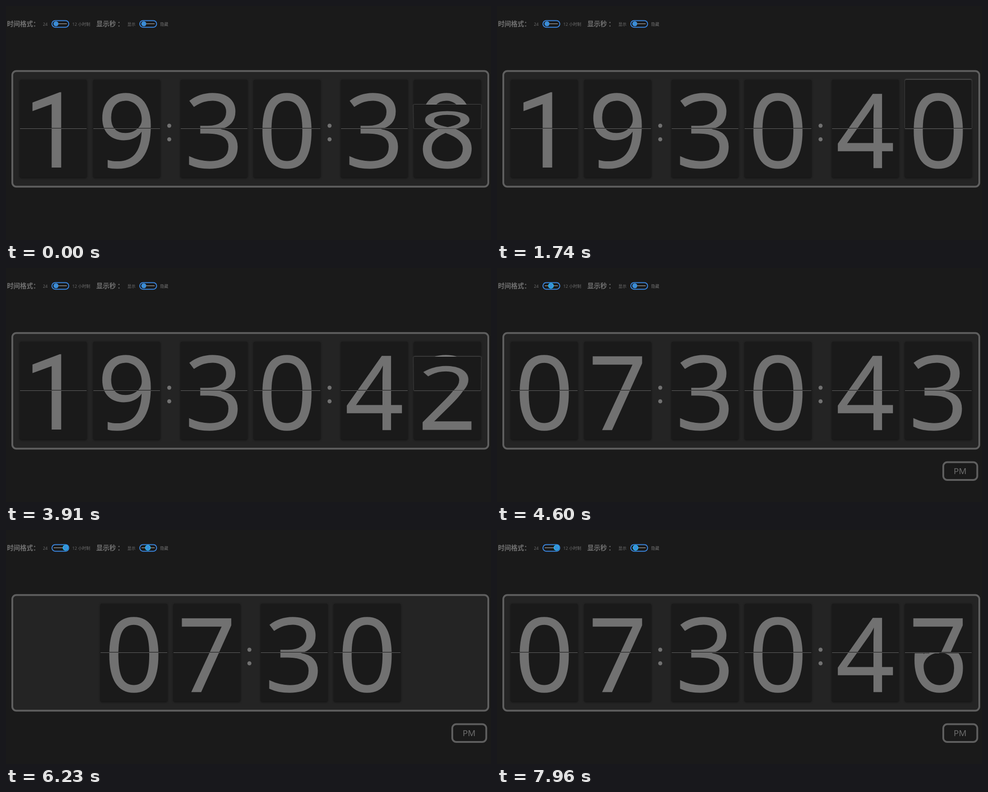
Animation, 1077 px wide and 520 px high, one loop 8000 ms. Source, as an HTML page:

```html
<!DOCTYPE html>
<html lang="zh">
<head>
<meta charset="utf-8">
<title>Flip clock</title>
<style>
  html, body { margin: 0; width: 100%; height: 100%; overflow: hidden; background: #1a1a1a; }
  #stage { position: relative; width: 1077px; height: 520px; overflow: hidden; }
  svg { position: absolute; left: 0; display: block; }
  text { fill: #717171; font-family: "Open Sans", "Noto Sans", "Noto Sans CJK SC", sans-serif; }
  .label { font: 700 14.5px "Noto Sans CJK SC", sans-serif; }
  .note { font-size: 9px; }
  .frame { stroke: #5f5f5f; stroke-width: 4; }
  .dot { fill: #717171; }
  .track { fill: #1a1a1a; stroke: #3a87e2; stroke-width: 2; }
  .rail { fill: #c8c8c8; }
  .knob { fill: #3b8dd8; }
  .knob.lit { stroke: #22bdf0; stroke-width: 1.5; }

  .card {
    position: absolute; top: 164px; width: 148px; height: 217px;
    border-radius: 3px; background: #1a1a1a;
    box-shadow: 0 1px 4px rgba(0, 0, 0, .65);
  }
  .half { position: absolute; left: 0; width: 148px; overflow: hidden; background: #1a1a1a; }
  .upper { top: 0; height: 109px; border-radius: 3px 3px 0 0; transform-origin: 50% 100%; }
  .lower { top: 109px; height: 108px; border-radius: 0 0 3px 3px; transform-origin: 50% 0; }
  .lower svg { top: -109px; }
  /* dark gap above the hinge line */
  .upper::after {
    content: ""; position: absolute; left: 0; right: 0; bottom: 0; height: 2px;
    background: linear-gradient(#1a1a1a 50%, #666 50%);
  }
  .flap.upper { box-shadow: 0 -1px 3px rgba(255, 255, 255, .35); }
  /* a thin outline gives the digits a slightly heavier stem */
  .digit { font-size: 228px; text-anchor: middle; stroke: #717171; stroke-width: 1.4px; }
  .digit.one { font-family: Roboto, sans-serif; font-size: 234px; stroke: none; }
</style>
</head>
<body>
<div id="stage">
  <svg width="1077" height="520">
    <text class="label" x="2" y="45.4">时间格式：</text>
    <text class="note" x="82" y="43.6">24</text>
    <text class="note" x="147.3" y="43.6">12 小时制</text>
    <text class="label" x="200.5" y="45.4">显示秒 ：</text>
    <text class="note" x="269.5" y="43.6">显示</text>
    <text class="note" x="342.3" y="43.6">隐藏</text>

    <g transform="translate(101 31)">
      <rect class="track" x="1" y="1.4" width="37.5" height="14.8" rx="7.4"/>
      <rect class="rail" x="5" y="8" width="29" height="1"/>
      <circle class="knob" cx="10" cy="8.5" r="5.5"/>
    </g>
    <g transform="translate(296 31)">
      <rect class="track" x="1" y="1.4" width="37.5" height="14.8" rx="7.4"/>
      <rect class="rail" x="5" y="8" width="29" height="1"/>
      <circle class="knob" cx="10" cy="8.5" r="5.5"/>
    </g>

    <rect class="frame" x="14" y="144.5" width="1057" height="257" rx="9" fill="#242424"/>
    <g class="colon"><circle class="dot" cy="266" r="4.5"/><circle class="dot" cy="296.3" r="4.5"/></g>
    <g class="colon"><circle class="dot" cy="266" r="4.5"/><circle class="dot" cy="296.3" r="4.5"/></g>

    <g id="period">
      <rect class="frame" x="991" y="431.5" width="75.5" height="39.5" rx="9" fill="none"/>
      <text x="1028.3" y="458" font-size="19" text-anchor="middle">PM</text>
    </g>
  </svg>
</div>

<script>
  const LOOP = 8000, FLIP = 600, SLIDE = 1000;
  const ticks = [-241, 734, 1732, 2707, 3700, 4690, 5680, 6670, 7660];
  const FIRST_SECOND = 38;
  const TO_12H = 4229, HIDE = 5854, SHOW = 7400;
  const wideX = [31, 194, 388, 550, 744, 906];
  const narrowX = [210, 372, 566, 728, 0, 0];

  const stage = document.getElementById("stage");
  const period = document.getElementById("period");
  const knobs = document.querySelectorAll(".knob");
  const colons = document.querySelectorAll(".colon");

  // CSS-style cubic bezier, solved by bisection
  function bezier(x1, y1, x2, y2) {
    const at = (s, a, b) => 3 * s * (1 - s) ** 2 * a + 3 * s * s * (1 - s) * b + s ** 3;
    return x => {
      if (x <= 0) return 0;
      if (x >= 1) return 1;
      let lo = 0, hi = 1;
      for (let i = 0; i < 24; i++) {
        const mid = (lo + hi) / 2;
        if (at(mid, x1, x2) < x) lo = mid; else hi = mid;
      }
      return at(lo, y1, y2);
    };
  }
  const easeInOut = bezier(.42, 0, .58, 1);
  const easeBack = bezier(.5, 0, .5, 1.7);

  function addHalf(card, kind) {
    const el = document.createElement("div");
    el.className = "half " + kind;
    el.innerHTML = '<svg width="148" height="217"><text class="digit" x="74" y="194.5"></text></svg>';
    card.append(el);
    return { el, text: el.querySelector("text") };
  }

  function makeCard() {
    const el = document.createElement("div");
    el.className = "card";
    stage.append(el);
    return {
      el,
      upper: addHalf(el, "upper"),
      lower: addHalf(el, "lower"),
      falling: addHalf(el, "flap upper"),
      landing: addHalf(el, "flap lower")
    };
  }
  const cards = wideX.map(makeCard);

  function setDigit(half, digit) {
    if (half.text.textContent === digit) return;
    half.text.textContent = digit;
    half.text.classList.toggle("one", digit === "1");
  }

  function setFlap(half, visible, angle) {
    half.el.style.display = visible ? "" : "none";
    half.el.style.transform = `perspective(7000px) rotateX(${angle}deg)`;
  }

  function drawCard(card, from, to, p) {
    const moving = from !== to && p < 1;
    setDigit(card.upper, to);
    setDigit(card.lower, moving ? from : to);
    setDigit(card.falling, from);
    setDigit(card.landing, to);
    setFlap(card.falling, moving && p < .5, -180 * p);
    setFlap(card.landing, moving && p >= .5, 180 * (1 - p));
  }

  function drawKnob(knob, pos, lit) {
    knob.setAttribute("cx", 10 + 21 * pos);
    knob.classList.toggle("lit", lit);
  }

  function render(t) {
    const k = ticks.filter(s => s <= t).length - 1;
    const p = easeInOut((t - ticks[k]) / FLIP);
    const half12 = t >= TO_12H;
    const hidden = t >= HIDE && t < SHOW;
    const head = half12 ? "0730" : "1930";
    const from = head + (FIRST_SECOND + k);
    const to = head + (FIRST_SECOND + k + 1);
    const xs = hidden ? narrowX : wideX;

    cards.forEach((card, i) => {
      card.el.style.left = xs[i] + "px";
      card.el.style.display = hidden && i > 3 ? "none" : "";
      drawCard(card, from[i], to[i], p);
    });

    colons[0].setAttribute("transform", `translate(${hidden ? 540.5 : 362.5} 0)`);
    colons[1].setAttribute("transform", "translate(718.5 0)");
    colons[1].style.display = hidden ? "none" : "";
    period.style.display = half12 ? "" : "none";

    const slide = start => easeBack((t - start) / SLIDE);
    drawKnob(knobs[0], slide(TO_12H), half12);
    drawKnob(knobs[1], slide(HIDE) - slide(SHOW), t >= HIDE);
  }

  const begin = performance.now();
  function loop() {
    render((performance.now() - begin) % LOOP);
    requestAnimationFrame(loop);
  }
  render(0);
  requestAnimationFrame(loop);
</script>
</body>
</html>
```
